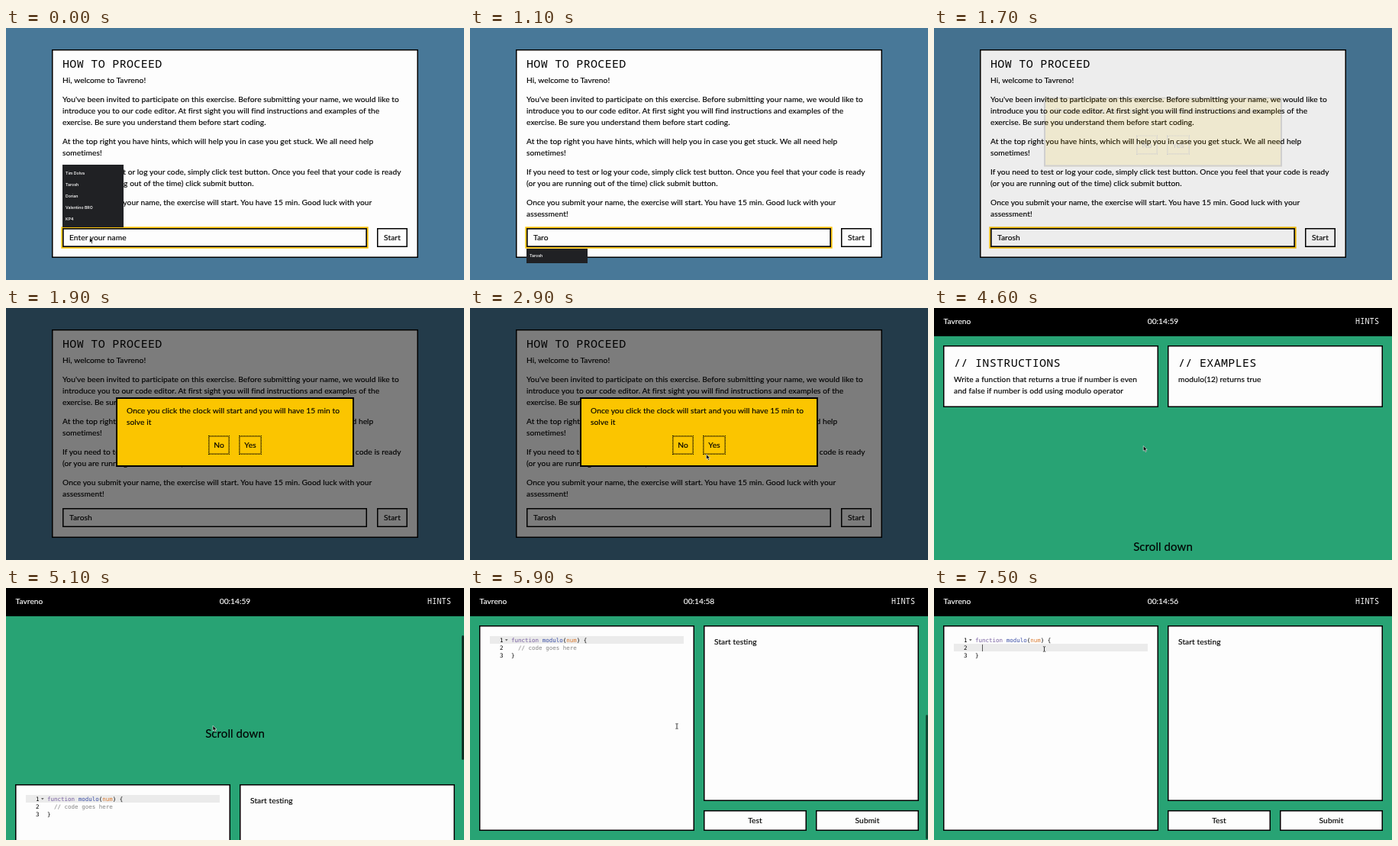
Recreate the animation shown at these times as an HTML page. Size 600 by 330 pixels, loop 8000 ms.

```html
<!DOCTYPE html>
<html lang="en">
<head>
<meta charset="utf-8">
<title>Code exercise</title>
<style>
html, body { margin: 0; width: 100%; height: 100%; overflow: hidden; }
#stage { position: relative; width: 600px; height: 330px; overflow: hidden; background: #487898;
  font: 10.2px/15px Lato, sans-serif; letter-spacing: .008em; color: #000; -webkit-text-stroke: .15px; }
#stage div, #stage svg { position: absolute; box-sizing: border-box; white-space: pre; }
.full { left: 0; top: 0; width: 600px; height: 330px; }
.box, .btn { background: #fdfdfd; box-shadow: inset 0 0 0 1.5px #000; }
.btn { text-align: center; }
.mono { font: 15px/20px "Noto Sans Mono", monospace; letter-spacing: .022em; -webkit-text-stroke: 0; }
.menu { background: #202124; color: #f1f1f1; left: 74px; width: 80px;
  font: 600 5.2px/15px Inter, sans-serif; letter-spacing: 0; padding: 4px; -webkit-text-stroke: 0; }
.code { font: 7.5px/10px "DejaVu Sans Mono", monospace; letter-spacing: 0; -webkit-text-stroke: 0; }
#field.focus { box-shadow: inset 0 0 0 1.7px #111, 0 0 0 1.7px #fbc30c; }
#dialog { left: 144px; top: 117px; width: 312px; height: 91px; background: #fbc500;
  box-shadow: inset 0 0 0 2px #000; }
#dialog .btn { top: 50px; height: 25px; line-height: 22px; background: none; border: 1.5px dotted #000;
  box-shadow: inset 0 0 0 .5px rgba(0, 0, 0, .6); }
#green { background: #28a374; overflow: hidden; }
#head { left: 0; top: 0; width: 600px; height: 37px; background: #000; color: #fff; }
#thumb { left: 596.5px; width: 3px; height: 163px; border-radius: 2px; background: #000; }
.kw { color: #755c9e; } .fn { color: #3b4fa6; } .arg { color: #dc7b30; } .note { color: #858585; }
</style>
</head>
<body>
<div id="stage">
  <div id="intro" class="full">
    <div class="box" style="left:60px;top:28px;width:480px;height:273px"></div>
    <div class="mono" style="left:74px;top:35.5px">HOW TO PROCEED</div>
    <div style="left:74px;top:60.5px">Hi, welcome to Tavreno!</div>
    <div style="left:74px;top:85.5px">You've been invited to participate on this exercise. Before submitting your name, we would like to
introduce you to our code editor. At first sight you will find instructions and examples of the
exercise. Be sure you understand them before start coding.</div>
    <div style="left:74px;top:140.5px">At the top right you have hints, which will help you in case you get stuck. We all need help
sometimes!</div>
    <div style="left:74px;top:180.5px">If you need to test or log your code, simply click test button. Once you feel that your code is ready
(or you are running out of the time) click submit button.</div>
    <div style="left:74px;top:220.5px">Once you submit your name, the exercise will start. You have 15 min. Good luck with your
assessment!</div>
    <div id="field" class="box" style="left:74px;top:262px;width:399px;height:25px;padding-left:9px;line-height:24px"></div>
    <div class="btn" style="left:486px;top:262px;width:40px;height:25px;line-height:24px">Start</div>
    <div id="names" class="menu" style="top:179px;height:82px">Tim Dolva
Tarosh
Dorian
Valentino BRO
KP4</div>
    <div id="match" class="menu" style="top:289px;height:19px;padding-top:2px">Tarosh</div>
    <div id="shade" class="full" style="background:#000"></div>
    <div id="dialog">
      <div style="left:14px;top:9.5px">Once you click the clock will start and you will have 15 min to
solve it</div>
      <div class="btn" style="left:121px;width:28px">No</div>
      <div class="btn" style="left:161px;width:30px">Yes</div>
    </div>
  </div>

  <div id="green" class="full">
    <div id="pages" class="full" style="height:660px">
      <div class="box" style="left:12px;top:49px;width:282px;height:81px"></div>
      <div class="mono" style="left:26px;top:60.5px">// INSTRUCTIONS</div>
      <div style="left:26px;top:85.5px">Write a function that returns a true if number is even
and false if number is odd using modulo operator</div>
      <div class="box" style="left:306px;top:49px;width:282px;height:81px"></div>
      <div class="mono" style="left:320px;top:60.5px">// EXAMPLES</div>
      <div style="left:320px;top:85.5px">modulo(12) returns true</div>
      <div style="left:0;top:302px;width:600px;text-align:center;font-size:15px;line-height:20px">Scroll down</div>

      <div class="box" style="left:12px;top:379px;width:282px;height:269px"></div>
      <div id="active" style="left:26px;width:254px;height:10px;background:#ebebeb"></div>
      <div class="code" style="left:26px;top:393.5px;width:17.5px;text-align:right">1
2
3</div>
      <svg style="left:46px;top:397px" width="4" height="3"><path d="M0 0H3.6L1.8 2.4Z" fill="#666"/></svg>
      <div class="code" style="left:54px;top:393.5px"><span class="kw">function</span> <span class="fn">modulo</span>(<span class="arg">num</span>) {
  <span id="note" class="note"></span>
}</div>
      <div id="caret" style="top:403.5px;width:1px;height:9.5px;background:#555"></div>
      <div class="box" style="left:306px;top:379px;width:282px;height:230px"></div>
      <div style="left:320px;top:392.5px">Start testing</div>
      <div class="btn" style="left:306px;top:621px;width:135px;height:27px;line-height:26px">Test</div>
      <div class="btn" style="left:453px;top:621px;width:135px;height:27px;line-height:26px">Submit</div>
    </div>
    <div id="head">
      <div style="left:12.5px;top:9.5px">Tavreno</div>
      <div id="clock" style="left:0;top:9.5px;width:600px;text-align:center;letter-spacing:0"></div>
      <div class="mono" style="left:552px;top:6.5px;font-size:10px">HINTS</div>
    </div>
    <div id="thumb"></div>
  </div>

  <svg id="arrow" width="8" height="11" style="overflow:visible">
    <path d="M0 0V6.6L1.6 5.3L2.7 7.9L4 7.3L2.9 4.9H5Z" fill="#000" stroke="#fff" stroke-width=".6"/>
  </svg>
  <svg id="beam" width="6" height="8" style="overflow:visible">
    <path d="M-1.6 -3.2H-.6L0 -2.7L.6 -3.2H1.6M0 -2.7V2.7M-1.6 3.2H-.6L0 2.7L.6 3.2H1.6" fill="none" stroke="#222" stroke-width=".9"/>
  </svg>
</div>
<script>
const LOOP = 8000, STEP = 100;
const el = Object.fromEntries([...document.querySelectorAll('[id]')].map(n => [n.id, n]));

// [time, value]: the last entry reached holds
const typed = [[0, 'Enter your name'], [100, 'T'], [700, 'Ta'], [900, 'Tar'], [1100, 'Taro'], [1400, 'Tarosh']];
const notes = [[0, '// code goes here'], [7300, '// code goes'], [7400, '// '], [7500, '']];
// [time, number...]: values between entries are blended
const dialogIn = [[1600, 0], [1700, .12], [1800, .65], [1900, 1], [3100, 1], [3200, .5], [3300, 0]];
const matchIn = [[100, 0], [300, 1], [1300, 1], [1400, 0]];
const thumbIn = [[4800, 0], [4900, .7], [5800, .7], [5900, .55], [6200, 0]];
const mouse = [[0, 109.5, 274.5], [1900, 109.5, 274.5], [2500, 263, 222], [3000, 315, 188],
  [4100, 315, 188], [4700, 271, 180], [5900, 271, 181], [6700, 144.5, 80]];

const hold = (steps, t) => steps.filter(s => s[0] <= t).pop()[1];
const ease = x => { x = Math.min(1, Math.max(0, x)); return x * x * (3 - 2 * x); };
const show = (node, on) => { node.style.display = on ? '' : 'none'; };
const move = (node, x, y) => { node.style.transform = `translate(${x}px, ${y}px)`; };

function blend(steps, t, curve = x => x) {
  const i = steps.findIndex(s => s[0] > t);
  if (i < 0) return steps[steps.length - 1].slice(1);
  if (i === 0) return steps[0].slice(1);
  const a = steps[i - 1], b = steps[i], k = curve((t - a[0]) / (b[0] - a[0]));
  return a.slice(1).map((v, j) => v + (b[j + 1] - v) * k);
}

function drawIntro(t) {
  const [p] = blend(dialogIn, t);
  el.field.textContent = hold(typed, t);
  el.field.classList.toggle('focus', t < 1800);
  show(el.names, t < 100);
  el.match.style.opacity = blend(matchIn, t)[0];
  el.shade.style.opacity = p * .51;
  el.dialog.style.opacity = p;
  move(el.dialog, 0, -30 * (1 - p));
}

function drawEditor(t) {
  const scroll = 330 * ease((t - 4820) / 680);
  const left = 900 - Math.max(0, Math.floor((t - 3300) / 1000));
  const pad = n => String(n).padStart(2, '0');
  move(el.pages, 0, -Math.round(scroll));
  el.clock.textContent = `00:${pad(Math.floor(left / 60))}:${pad(left % 60)}`;
  el.thumb.style.top = scroll / 2 + 1 + 'px';
  el.thumb.style.opacity = blend(thumbIn, t)[0];

  const note = hold(notes, t);
  el.note.textContent = note;
  el.active.style.top = (t < 6800 ? 393 : 403) + 'px';
  el.caret.style.left = 62.5 + note.length * 4.515 + 'px';
  show(el.caret, t >= 6800);
}

function draw(t) {
  const green = t >= 3300, beam = t >= 5200;
  show(el.intro, !green);
  show(el.green, green);
  if (green) drawEditor(t); else drawIntro(t);

  const [x, y] = blend(mouse, t, ease);
  move(el.arrow, x, y);
  move(el.beam, x, y);
  show(el.arrow, !beam && (t < 100 || t >= 2000));
  show(el.beam, beam);
}

const start = performance.now();
function tick() {
  const t = (performance.now() - start) % LOOP;
  draw(Math.floor(t / STEP) * STEP);
  requestAnimationFrame(tick);
}
tick();
</script>
</body>
</html>
```
